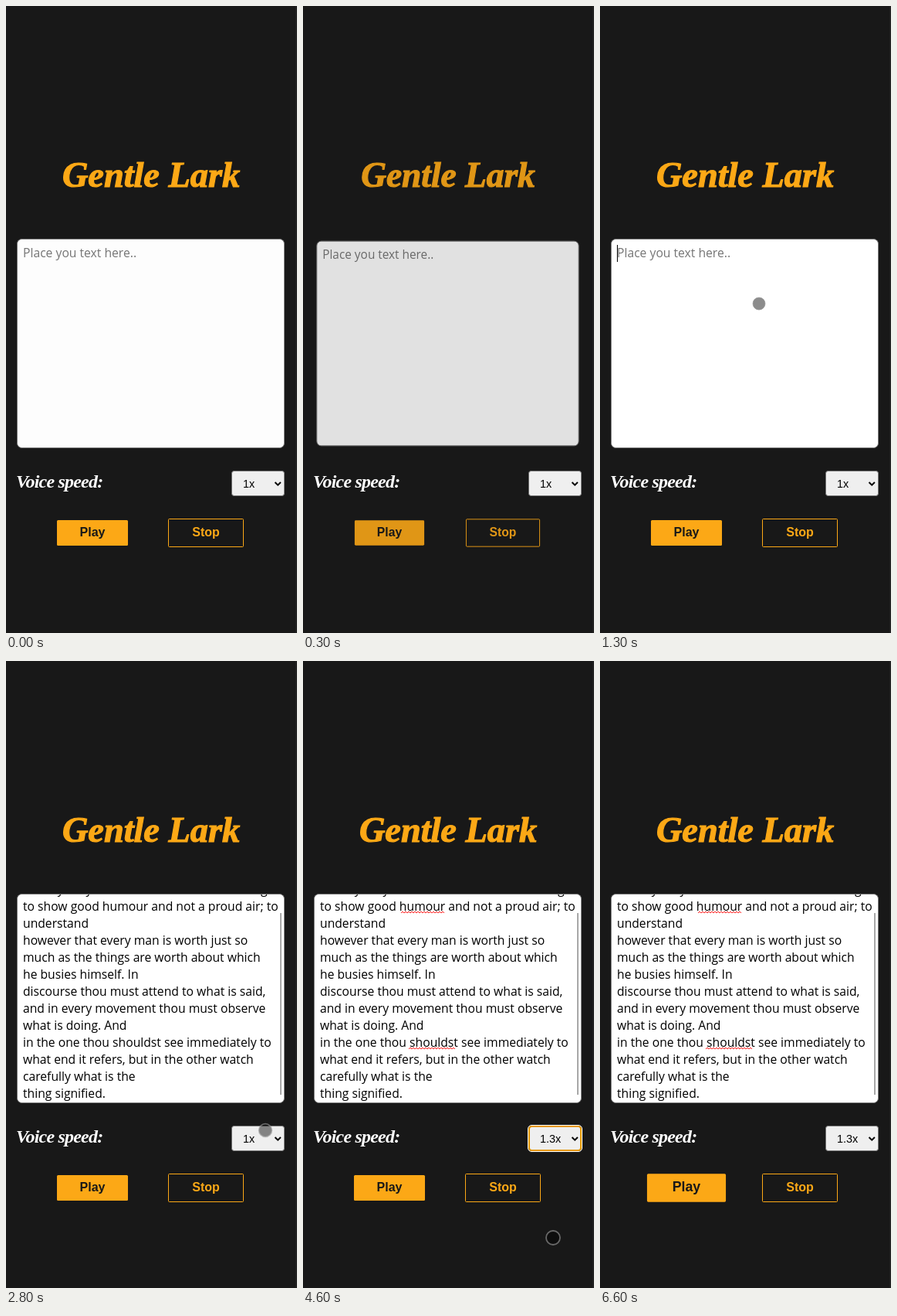
These frames come from a looping animation (377 px wide and 811 px high, 8300 ms). An HTML page:

```html
<!DOCTYPE html>
<html lang="en">
<head>
<meta charset="utf-8">
<title>Text to speech</title>
<style>
  html, body { margin: 0; height: 100%; overflow: hidden; background: #181818; }
  svg { display: block; width: 377px; height: 811px; }
  text { font: 14.4px "Liberation Sans", Arial, sans-serif; white-space: pre; }
  .script { font: italic bold 24px "Liberation Serif", serif; letter-spacing: -.8px; fill: #fff; }
  #title { font-size: 46.3px; letter-spacing: 0; text-anchor: middle; fill: #fca816; stroke: #fca816; stroke-width: 1.2; }
  .body text { font: 500 15.7px "Open Sans", Nunito, sans-serif; }
  .body #hint { font-weight: 400; fill: #757575; }
  .button text { font-weight: bold; font-size: 16px; text-anchor: middle; }
  #menu text { font-size: 15px; }
</style>
</head>
<body>
<svg viewBox="0 0 377 811">
  <clipPath id="inside"><rect x="15" y="302" width="345" height="269" rx="5"/></clipPath>
  <rect width="377" height="811" fill="#181818"/>
  <rect x="375.5" width="1.5" height="811" fill="#262626"/>
  <text id="title" class="script" x="188" y="234">Gentle Lark</text>

  <g id="area" class="body">
    <rect id="paper" x="14.5" y="301.5" width="346" height="270" rx="6" stroke="#767676"/>
    <text id="hint" x="22" y="325">Place you text here..</text>
    <g id="passage" clip-path="url(#inside)">
      <g id="lines"></g>
      <path id="typos" fill="none" stroke="#f22"/>
      <path d="M356 326V561" stroke="#a8a8a8" stroke-width="2"/>
    </g>
    <rect id="caret" width="1" height="22"/>
  </g>

  <text class="script" x="13" y="623">Voice speed:</text>

  <g class="button" id="play">
    <rect x="66" y="665" width="92" height="33" rx="1.5" fill="#fca816"/>
    <text x="112" y="686" fill="#181818">Play</text>
  </g>
  <g class="button" id="stop">
    <rect x="210.5" y="663.5" width="97" height="36" rx="1" fill="none" stroke="#fca816"/>
    <text x="259" y="686" fill="#fca816">Stop</text>
  </g>

  <rect x="292.5" y="601.5" width="68" height="32" rx="3" fill="#efefef" stroke="#767676"/>
  <text id="speed" x="307" y="623"></text>
  <path d="M348.5 616l3.7 3.7 3.7-3.7" fill="none" stroke="#000" stroke-width="2"/>
  <g id="focus" fill="none">
    <rect x="291.5" y="600.5" width="70" height="34" rx="4.5" stroke="#fff"/>
    <rect x="293" y="602" width="67" height="31" rx="3.5" stroke="#e59700" stroke-width="2"/>
  </g>

  <g id="menu">
    <rect x="292.5" y="634.5" width="68" height="190" fill="#efefef" stroke="#767676"/>
    <rect id="hover" x="293" width="67" height="30" fill="#a5d8ec"/>
    <g id="options"></g>
  </g>
  <path id="arrow" d="M0 0V16.5L3.8 13 6.5 19 9.3 17.7 6.7 12H12Z" fill="#111" stroke="#fff"/>
  <circle id="touch" fill="#000" fill-opacity=".45" stroke="#969696" stroke-opacity=".65"/>
</svg>
<script>
const $ = id => document.getElementById(id);
const set = (el, attrs) => { for (const k in attrs) el.setAttribute(k, attrs[k]); };
const show = (id, on) => { $(id).style.display = on ? '' : 'none'; };
const clamp = v => Math.min(1, Math.max(0, v));
const mix = (a, b, u) => a + (b - a) * u;

const LOOP = 8300, STEP = 100;
const SPEEDS = ['1x', '1.1x', '1.2x', '1.3x', '1.5x', '2x'];
const LINES = [
  'It is thy duty then in the midst of such things',
  'to show good humour and not a proud air; to',
  'understand',
  'however that every man is worth just so',
  'much as the things are worth about which',
  'he busies himself. In',
  'discourse thou must attend to what is said,',
  'and in every movement thou must observe',
  'what is doing. And',
  'in the one thou shouldst see immediately to',
  'what end it refers, but in the other watch',
  'carefully what is the',
  'thing signified.'
];

// Each track: [time, x, y] points; the last one marks when the mark disappears.
const TOUCHES = [
  [[600, 206, 59], [900, 206, 385], [1400, 206, 385]],
  [[2200, 215, 387], [2400, 215, 387]],
  [[2600, 336, 596], [2800, 336, 607], [3000, 338, 618]],
  [[4200, 325, 742], [4400, 295, 730], [4600, 324, 746], [5000, 324, 746],
   [5700, 120, 680], [6300, 120, 680], [6500, 24, 473], [6600, 24, 473]]
];
const ARROW = [[3200, 334, 622], [3500, 326, 656], [3700, 326, 690], [4000, 326, 742], [4100, 326, 742]];

function addText(parent, x, y, content) {
  const el = document.createElementNS('http://www.w3.org/2000/svg', 'text');
  set(el, { x, y });
  el.textContent = content;
  parent.append(el);
}
LINES.forEach((line, i) => addText($('lines'), 22, 301 + 22 * i, line));
SPEEDS.forEach((label, i) => addText($('options'), 308, 656 + 30 * i, label));

const squiggle = (x, y, width) => `M${x} ${y}` + 'l2 -2l2 2'.repeat(width / 4);
set($('typos'), { d: squiggle(127, 326, 57) + squiggle(137, 502, 63) });

function position(track, t) {
  if (t < track[0][0] || t >= track[track.length - 1][0]) return null;
  const i = track.findIndex(p => p[0] > t);
  const [a, b] = [track[i - 1], track[i]];
  const u = (t - a[0]) / (b[0] - a[0]);
  return [mix(a[1], b[1], u), mix(a[2], b[2], u)];
}

function zoom(id, cx, cy, scale, opacity) {
  set($(id), { transform: `translate(${cx} ${cy}) scale(${scale}) translate(${-cx} ${-cy})`, opacity });
}

function place(id, at) {
  show(id, at);
  if (at) set($(id), { transform: `translate(${at})` });
}

function draw(t) {
  const entry = t === 0 ? 1 : 1 - (1 - clamp(t / 500)) ** 2.3;
  const size = mix(.84, 1, entry);
  const press = clamp((t - 5700) / 300);
  const grow = 1 + .11 * press * press * (3 - 2 * press);
  zoom('title', 188, 219, size, entry);
  zoom('area', 187.5, 436.5, size, entry);
  zoom('play', 112, 682, size * grow, entry);
  zoom('stop', 259, 681.5, size, entry);

  const pasted = t >= 1900;
  show('hint', !pasted);
  show('passage', pasted);
  show('typos', t >= 3000);
  set($('paper'), { fill: t < 1100 ? '#fdfdfd' : '#fff' });
  show('caret', (t >= 1100 && t < 1600) || (t >= 1900 && t < 2400) || (t >= 2900 && t < 3200));
  set($('caret'), pasted ? { x: 134, y: 549 } : { x: 22, y: 309 });

  const arrow = position(ARROW, t);
  place('arrow', arrow);
  show('menu', arrow);
  if (arrow) {
    const row = Math.max(0, Math.floor((arrow[1] - 635) / 30));
    set($('hover'), { y: 635 + 30 * row });
    [...$('options').children].forEach((el, i) => set(el, { fill: i === row ? '#fff' : '#000' }));
  }
  $('speed').textContent = t < 4100 ? '1x' : '1.3x';
  show('focus', t >= 4100 && t < 5700);

  place('touch', TOUCHES.map(track => position(track, t)).find(Boolean));
  set($('touch'), t < 1400 ? { r: 8, 'stroke-width': 1 } : { r: t < 3000 ? 8.3 : 9, 'stroke-width': 1.8 });
}

function tick() {
  draw(Math.floor(performance.now() % LOOP / STEP) * STEP);
  requestAnimationFrame(tick);
}
tick();
</script>
</body>
</html>
```
